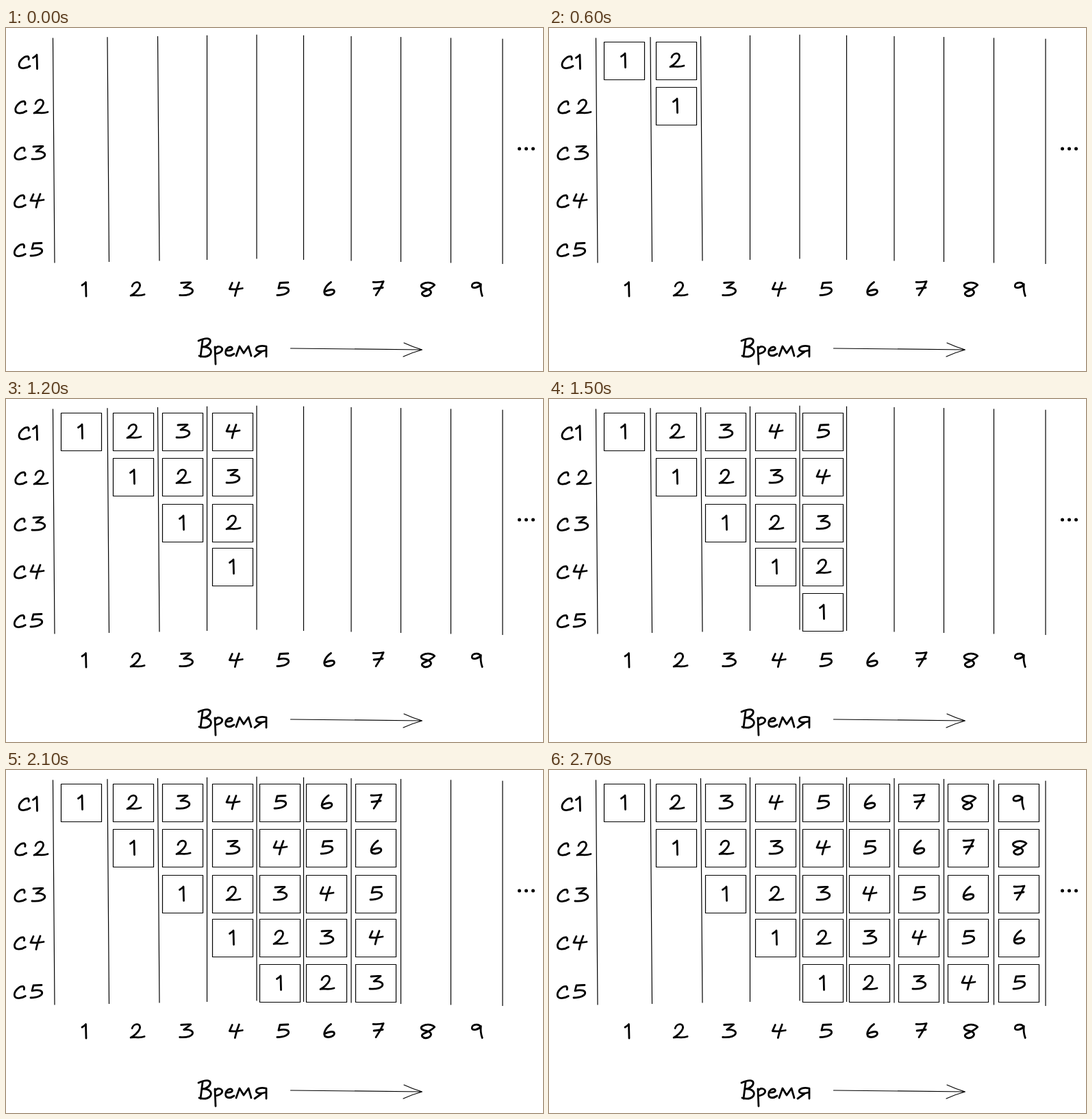
An HTML page for the animation above (3000 ms loop, 784x500 px).

```html
<!DOCTYPE html>
<html lang="ru">
<head>
<meta charset="utf-8">
<title>Время</title>
<style>
  html, body { margin: 0; width: 100%; height: 100%; overflow: hidden; background: #fff; }
  svg { display: block; }
  path { fill: none; stroke: #000; stroke-linecap: round; stroke-linejoin: round; }
  .pen { stroke-width: 2.8; }
  .thin { stroke-width: 1.2; }
</style>
</head>
<body>
<svg id="stage" width="784" height="500" viewBox="0 0 784 500" role="img" aria-label="С1–С5, Время 1–9"></svg>
<script>
const stage = document.getElementById('stage');
const STEP = 300, COLS = 9, ROWS = 5;
const CELL_W = 59, CELL_H = 55;

// Key positions of the hand-drawn grid
const dividers = [68.5, 148, 221.5, 293.5, 366, 434.5, 504, 576.5, 649.5, 725];
const lefts = [80.5, 156.5, 228.5, 301.5, 370.5, 438.5, 510.5, 582.5, 656.5];
const tops = [20.5, 86.5, 153.5, 217.5, 283.5];
const rowDigits = [44, 50, 47, 45, 44];

// Handwritten strokes, each centred on 0,0
const digits = [
  '',
  'M-4.5-5.5Q-1-7.5 1-10L1.5 10.5',
  'M-7-4C-5-12 7-12 4-3 2 2-5 8-9 9.5-4 8 3 11 11 8',
  'M-7-9Q1-10 7-9.5L-3-2C15-4 15 11-9 9',
  'M-5-9L-9 0Q0 1 10-1M5-9.5Q1 0 -1 10',
  'M8-9.5L-4-9-6-1C14-6 14 9-8 9',
  'M3-10C-6-4-12 9-1 9 11 9 12-5-6 4',
  'M-7-10Q1-9.5 8-11Q4-1-3 9M-6-.5L7-2',
  'M11-6C0-15-20-3 0 0 14 4-1 15-7 8-10 3 5 2 11-6',
  'M5-6C1-12-9-9-8-4-7 0 2-2 5-7Q4 2 7 10'
];
const letterC = 'M6-3.5Q7-6 5-8C-1-9-8-1-8 4-8 11 2 10 8 6';
const word = [
  'M287 455L284 479M281 456C305 445 301 464 287 465 306 464 302 484 282 478',
  'M305 465L306 490M305 468C311 458 325 471 306 475',
  'M321 470C337 472 329 459 322 468 317 478 326 480 333 475',
  'M336 478L341 464 347 474 354 464 358 478',
  'M380 479V464C361 460 360 476 379 470M373 472L363 479'
];

function add(parent, tag, attrs) {
  const el = document.createElementNS('http://www.w3.org/2000/svg', tag);
  for (const key in attrs) el.setAttribute(key, attrs[key]);
  return parent.appendChild(el);
}
const stroke = (parent, d, kind = 'thin') => add(parent, 'path', { d, class: kind });
const glyph = (parent, d, x, y) =>
  add(parent, 'path', { d, class: 'pen', transform: `translate(${x} ${y})` });

// Dividers lean at the left and are shortest in the middle
dividers.forEach((x, i) => {
  const off = Math.abs(i - 4), lean = i < 3 ? 2.5 : 0;
  stroke(stage, `M${x} ${10 + 1.2 * off}L${x + lean} ${336 + 1.5 * off}`);
});

// Row labels
for (let r = 0; r < ROWS; r++) {
  const y = 49 + 64.5 * r + r * r;
  glyph(stage, letterC, 20 + 7 / (r + 1) ** 2, y + .5);
  glyph(stage, digits[r + 1], rowDigits[r], y);
}

// Time axis
lefts.forEach((x, c) => glyph(stage, digits[c + 1], x + 35 - .4 * c, 380.5));
word.forEach(d => stroke(stage, d, 'pen'));
stroke(stage, 'M415.5 467L607.5 469M581 459Q594 465 607.5 469Q593 473 580 479');
for (let i = 0; i < 3; i++) add(stage, 'circle', { cx: 749.5 + 10 * i, cy: 176, r: 2.5 });

// Cells, grouped by column
const columns = lefts.map((x, c) => {
  const group = add(stage, 'g', {});
  tops.slice(0, c + 1).forEach((y, r) => {
    stroke(group, `M${x} ${y}h${CELL_W}v${CELL_H}h${-CELL_W}z`);
    glyph(group, digits[c - r + 1], x + CELL_W / 2, y + CELL_H / 2 - 1);
  });
  return group;
});

function draw(time) {
  const shown = Math.floor(time / STEP) % (COLS + 1);
  columns.forEach((g, c) => g.setAttribute('visibility', c < shown ? 'visible' : 'hidden'));
}
const start = performance.now();
function tick() {
  draw(performance.now() - start);
  requestAnimationFrame(tick);
}
tick();
</script>
</body>
</html>
```
